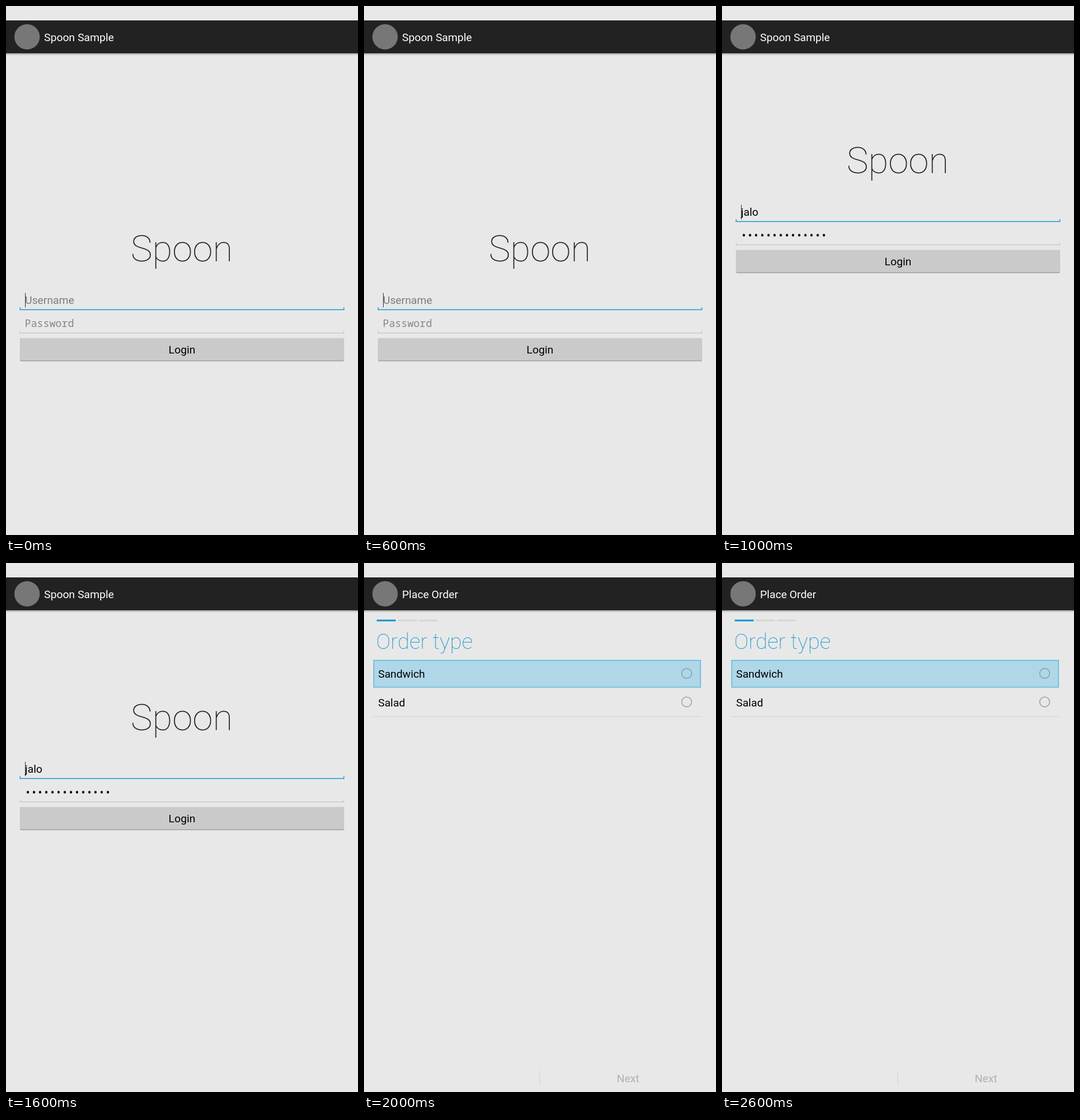
Recreate the animation shown at these times as an HTML page. Size 610x918 px, loop 3000 ms.

```html
<!DOCTYPE html>
<html lang="en">
<head>
<meta charset="utf-8">
<title>Spoon Sample</title>
<style>
  html, body { margin: 0; width: 100%; height: 100%; overflow: hidden; }
  svg { display: block; width: 100vw; height: 100vh; font: 18.8px Roboto, sans-serif; }
  .thin { font-weight: 100; }
  .mono { font: 17.8px "Noto Sans Mono", monospace; }
  .mid { text-anchor: middle; }
</style>
</head>
<body>
<svg viewBox="0 0 610 918">
  <defs>
    <radialGradient id="glow" gradientUnits="userSpaceOnUse" r="1"
      gradientTransform="translate(297 838) scale(375 605)">
      <stop stop-color="#fdfdfd"/>
      <stop offset="1" stop-color="#e8e8e8"/>
    </radialGradient>
    <linearGradient id="shade" x2="0" y2="1">
      <stop stop-color="#000" stop-opacity=".3"/>
      <stop offset="1" stop-color="#000" stop-opacity="0"/>
    </linearGradient>
  </defs>
  <rect width="610" height="918" fill="url(#glow)"/>
  <rect y="25" width="610" height="57" fill="#222"/>
  <rect y="82" width="610" height="4" fill="url(#shade)"/>
  <circle cx="36.5" cy="53.5" r="22" fill="#777"/>
  <text id="title" x="66" y="61" fill="#fff"></text>

  <g id="login">
    <text class="thin mid" x="304.5" y="443" font-size="63.5" fill="#222">Spoon</text>
    <text id="user" x="33" y="517"></text>
    <path d="M33.5 498V523" stroke="#333"/>
    <path d="M24.5 523V527H585.5V523" fill="none" stroke="#1f9dcb" stroke-width="1.5"/>
    <text id="password" class="mono" x="32.5" y="557"></text>
    <path d="M24.5 563.5V567.5H585.5V563.5" fill="none" stroke="#bdbdbd"/>
    <rect x="24.5" y="576" width="561" height="40.5" rx="1.5" fill="#a0a0a0"/>
    <rect x="24.5" y="576" width="561" height="39" rx="1.5" fill="#cacaca"/>
    <path d="M25 576.5H585" stroke="#d4d4d4"/>
    <text class="mid" x="305" y="602.5">Login</text>
  </g>

  <g id="order">
    <g stroke="#d6d6d6" stroke-width="3">
      <path d="M22 99.8H55" stroke="#1098cc"/>
      <path d="M59 99.8H91.5M95.5 99.8H128"/>
    </g>
    <text class="thin" x="21" y="149" font-size="37.5" fill="#1098cc">Order type</text>
    <rect x="17" y="169" width="566" height="46.5" fill="#b0d7e7" stroke="#72c4e0" stroke-width="2"/>
    <text x="24.5" y="199">Sandwich</text>
    <text x="24.5" y="248.5">Salad</text>
    <g fill="none" stroke-width="1.5">
      <circle cx="559.2" cy="191.5" r="8.6" stroke="#7f9fac"/>
      <circle cx="559.2" cy="241" r="8.6" stroke="#a2a2a2"/>
    </g>
    <path d="M16 266.5H584M304.5 881V906" stroke="#d0d0d0"/>
    <text class="mid" x="457.5" y="900.5" fill="#b0b0b0">Next</text>
  </g>
</svg>
<script>
  const el = id => document.getElementById(id);
  const show = (id, on) => el(id).setAttribute('display', on ? 'inline' : 'none');

  function write(id, text, color) {
    el(id).textContent = text;
    el(id).setAttribute('fill', color);
  }

  function draw(now) {
    const step = Math.floor(now / 1000) % 3;
    const typed = step === 1;
    show('login', step < 2);
    show('order', step === 2);
    write('title', step < 2 ? 'Spoon Sample' : 'Place Order', '#fff');
    write('user', typed ? 'jalo' : 'Username', typed ? '#000' : '#7d7d7d');
    write('password', typed ? '•'.repeat(14) : 'Password', typed ? '#000' : '#868686');
    // The form moves up to make room for the keyboard.
    el('login').setAttribute('transform', `translate(0 ${typed ? -153 : 0})`);
    requestAnimationFrame(() => draw(performance.now()));
  }
  draw(performance.now());
</script>
</body>
</html>
```
